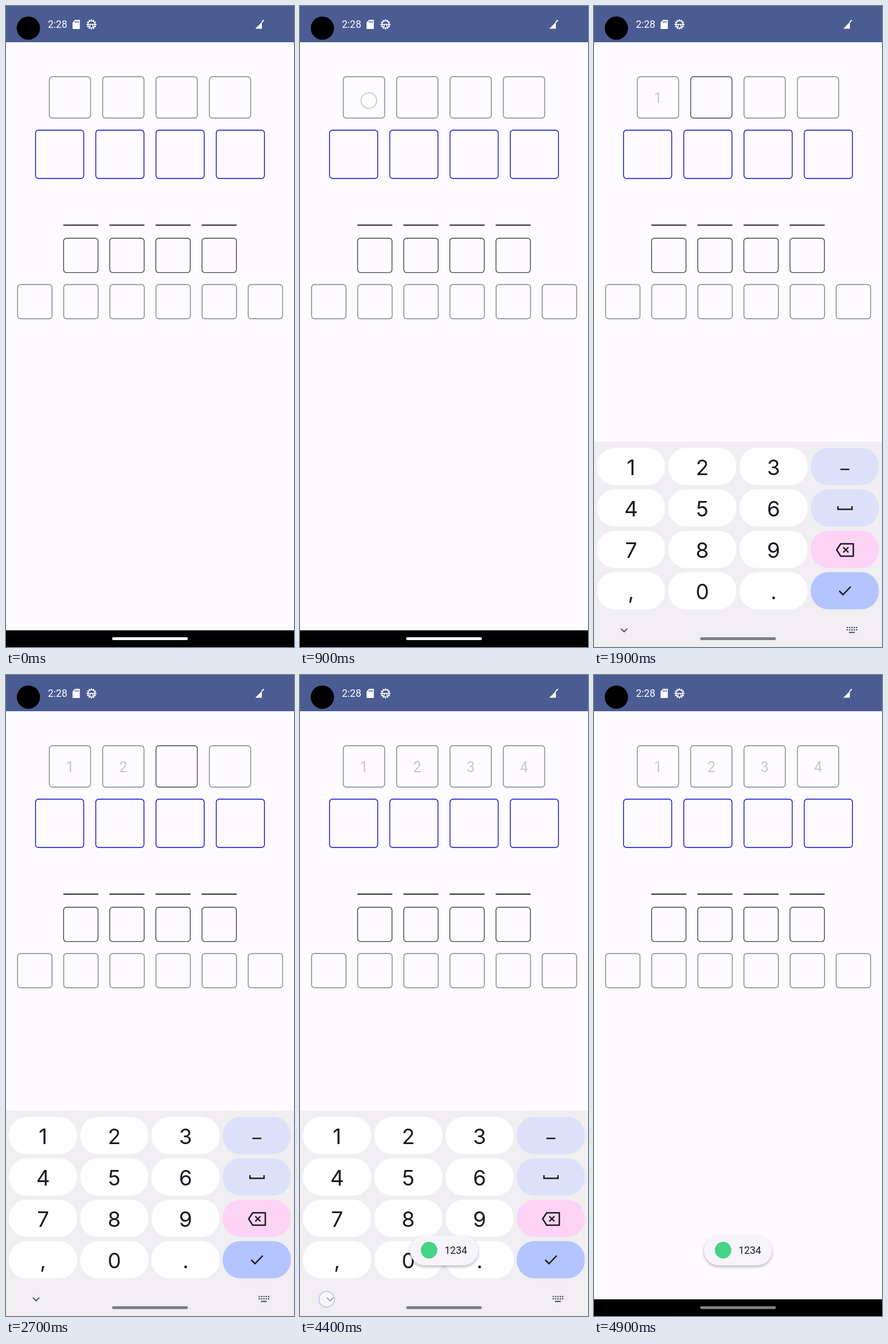
An HTML page with a canvas for the animation above (5000 ms loop, 502 by 1115 pixels).

```html
<!DOCTYPE html>
<html lang="en">
<head>
<meta charset="utf-8">
<title>PIN entry</title>
<style>
html, body { margin: 0; width: 100%; height: 100%; overflow: hidden; background: #fdfbff; }
canvas { display: block; width: 502px; height: 1115px; }
</style>
</head>
<body>
<canvas id="stage"></canvas>
<script>
const W = 502, H = 1115, LOOP = 5000;
const canvas = document.getElementById('stage');
const dpr = window.devicePixelRatio || 1;
canvas.width = Math.round(W * dpr);
canvas.height = Math.round(H * dpr);
const c = canvas.getContext('2d');

const INK = '#1b1b1f', GRAY = '#828185', DARK = '#444247', BLUE = '#0a0ac8';
const KEYBOARD_H = 357;

// Touches: start, end, x, y
const TAPS = [
  [850, 1000, 120, 164.5],
  [1580, 1680, 66, 804],
  [2180, 2280, 190, 804],
  [2780, 2880, 314, 804],
  [3280, 3380, 66, 876],
  [4350, 4500, 46.5, 1086]
];
const TYPED_AT = [1700, 2300, 2900, 3400];
const FOCUS_AT = 1050;

const clamp = v => Math.min(1, Math.max(0, v));
const progress = (t, from, to) => clamp((t - from) / (to - from));

function bezier(x1, y1, x2, y2) {
  const at = (a, b, s) => 3 * a * s * (1 - s) ** 2 + 3 * b * s * s * (1 - s) + s ** 3;
  return x => {
    let lo = 0, hi = 1;
    for (let i = 0; i < 24; i++) {
      const mid = (lo + hi) / 2;
      if (at(x1, x2, mid) < x) lo = mid; else hi = mid;
    }
    return at(y1, y2, lo);
  };
}
const easeShow = bezier(0.4, 0, 0.2, 1);
const easeHide = bezier(0.4, 0, 1, 1);

function rect(x, y, w, h, color) {
  c.fillStyle = color;
  c.fillRect(x, y, w, h);
}

function roundPath(x, y, w, h, r) {
  c.beginPath();
  c.roundRect(x, y, w, h, r);
}

function fillRound(x, y, w, h, r, color) {
  roundPath(x, y, w, h, r);
  c.fillStyle = color;
  c.fill();
}

function box(x, y, w, h, color) {
  roundPath(x, y, w, h, 5);
  c.strokeStyle = color;
  c.lineWidth = 1.4;
  c.stroke();
}

function disc(x, y, r, color) {
  c.beginPath();
  c.arc(x, y, r, 0, Math.PI * 2);
  c.fillStyle = color;
  c.fill();
}

function poly(points) {
  c.beginPath();
  points.forEach(([x, y], i) => i ? c.lineTo(x, y) : c.moveTo(x, y));
}

function line(points, color, width) {
  poly(points);
  c.strokeStyle = color;
  c.lineWidth = width;
  c.stroke();
}

function area(points, color) {
  poly(points);
  c.closePath();
  c.fillStyle = color;
  c.fill();
}

function text(str, x, y, size, color, family = 'Roboto', align = 'center') {
  c.font = `${size}px ${family}, sans-serif`;
  c.textAlign = align;
  c.fillStyle = color;
  c.fillText(str, x, y);
}

function gear(x, y) {
  c.save();
  c.translate(x, y);
  c.strokeStyle = '#fff';
  c.lineWidth = 1.7;
  c.beginPath();
  c.arc(0, 0, 6.3, 0, Math.PI * 2);
  c.stroke();
  for (let i = 0; i < 12; i++) {
    line([[0, -6.5], [0, -8.8]], '#fff', 2);
    c.rotate(Math.PI / 6);
  }
  line([[-6, 0], [6, 0]], '#fff', 1.6);
  line([[-2, 0], [-3, 5.5]], '#fff', 1.4);
  line([[2, 0], [3, 5.5]], '#fff', 1.4);
  c.restore();
}

function statusBar() {
  rect(0, 0, W, 63, '#4a5c92');
  disc(39, 38.5, 20.3, '#000');
  text('2:28', 73, 38.2, 17.5, '#fff', 'Roboto', 'left');
  area([[120.5, 24], [128.7, 24], [128.7, 40], [116, 40], [116, 28.5]], '#fff');
  for (let i = 0; i < 3; i++) rect(120 + i * 2.7, 26, 1.3, 3.5, '#4a5c92');
  gear(149, 32);
  area([[434.5, 39.5], [446, 28], [446, 39.5]], '#fff');
  line([[445.5, 28.5], [449.5, 24.5]], '#fff', 2);
}

function fields(t) {
  const typed = TYPED_AT.filter(at => t >= at).length;
  const focus = t >= FOCUS_AT ? typed : -1;
  for (let i = 0; i < 4; i++) {
    const x = 75.5 + i * 93;
    box(x, 123, 72, 72, i === focus ? DARK : GRAY);
    if (i < typed) text(i + 1, x + 36, 168.8, 25, '#c8c6cb');
    box(51.5 + i * 105, 216, 84, 84, BLUE);
    const left = 100.4 + i * 80.4;
    rect(left - 0.5, 380, 61, 2.4, DARK);
    box(left, 404, 60, 59.6, DARK);
  }
  for (let i = 0; i < 6; i++) box(20.2 + i * 80.4, 484.5, 60, 59.5, GRAY);
}

function keyIcons() {
  rect(429.5, 804.8, 15.5, 2.5, INK);
  line([[425.2, 870], [425.2, 875.5], [449.8, 875.5], [449.8, 870]], INK, 2.5);
  c.lineJoin = 'round';
  line([[423, 946], [430, 935.5], [452, 935.5], [452, 957], [430, 957], [423, 946], [430, 935.5]], INK, 2.5);
  c.lineJoin = 'miter';
  line([[434.5, 941.5], [443.5, 950.5]], INK, 2.4);
  line([[443.5, 941.5], [434.5, 950.5]], INK, 2.4);
  line([[427.5, 1017.5], [434, 1024], [447.5, 1010]], INK, 2.5);
  line([[47, 1083], [52.5, 1088.5], [58, 1083]], '#55545a', 2);
  for (let row = 0; row < 2; row++)
    for (let i = 0; i < 5; i++) rect(440.3 + i * 4.1, 1080 + row * 4, 2.3, 2.3, '#55545a');
  rect(444.5, 1088.6, 10, 2.2, '#55545a');
}

function keyboard(offset) {
  c.save();
  c.translate(0, offset);
  rect(0, H - KEYBOARD_H - 1, W, 1, '#f6f4f8');
  rect(0, H - KEYBOARD_H, W, KEYBOARD_H, '#f0eef1');
  const labels = ['123', '456', '789', ',0.'];
  const sideColors = ['#dce1f9', '#dce1f9', '#fdd3f5', '#b3c4ff'];
  labels.forEach((row, r) => {
    const y = 768.7 + r * 72;
    for (let i = 0; i < 4; i++) {
      const x = 5.2 + i * 124.2;
      fillRound(x, y, 118.7, 64.8, 31, i < 3 ? '#fefdff' : sideColors[r]);
      if (i < 3) text(row[i], x + 59.4, y + 47.3, 37, INK, 'Inter');
    }
  });
  keyIcons();
  c.restore();
}

function toast(alpha) {
  if (!alpha) return;
  c.save();
  c.globalAlpha = alpha;
  c.shadowColor = 'rgba(0,0,0,0.28)';
  c.shadowBlur = 5 * dpr;
  c.shadowOffsetY = 2.5 * dpr;
  fillRound(191.5, 975, 119, 52, 26, '#f6f4f9');
  c.shadowColor = 'transparent';
  disc(225, 1000.5, 14.4, '#45d487');
  text('1234', 252, 1007.3, 17.5, INK, 'Roboto', 'left');
  c.restore();
}

function touch(x, y) {
  disc(x, y, 13.5, 'rgba(255,255,255,0.45)');
  c.beginPath();
  c.arc(x, y, 13.6, 0, Math.PI * 2);
  c.strokeStyle = '#c3c6e8';
  c.lineWidth = 1.8;
  c.stroke();
}

function draw(t) {
  c.setTransform(dpr, 0, 0, dpr, 0, 0);
  rect(0, 0, W, H, '#fdfbff');
  statusBar();
  fields(t);
  rect(0, 1086, W, 29, '#000');

  const shown = easeShow(progress(t, 1060, 1345)) - easeHide(progress(t, 4540, 4750));
  if (shown > 0.001) keyboard((1 - shown) * KEYBOARD_H);
  fillRound(185, 1098, 132, 5, 2.5, t < 1400 ? '#fbfafc' : '#7e7d81');
  toast(progress(t, 3450, 3600));
  for (const [from, to, x, y] of TAPS) if (t >= from && t < to) touch(x, y);
}

function frame() {
  draw(performance.now() % LOOP);
  requestAnimationFrame(frame);
}
frame();
</script>
</body>
</html>
```
